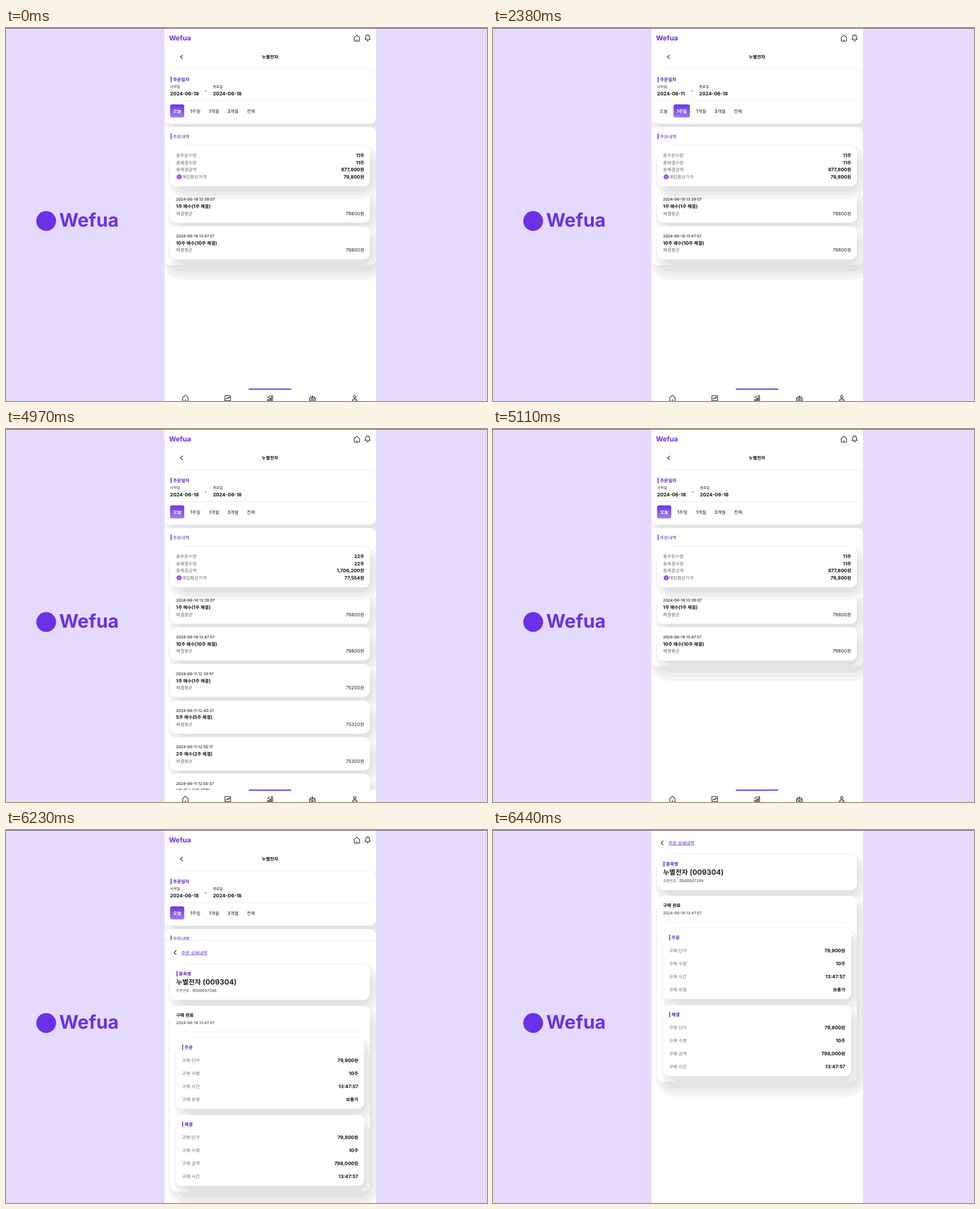
Animation, 850 px wide and 659 px high, one loop 8 s. Source, as an HTML page:

```html
<!DOCTYPE html>
<html lang="ko">
<head>
<meta charset="utf-8">
<title>주문내역</title>
<style>
  html, body { margin: 0; width: 100%; height: 100%; overflow: hidden; background: #e4dafd; }
  svg { display: block; width: 100vw; height: 100vh; }
  text {
    font-family: Inter, "Noto Sans CJK KR", "Noto Sans CJK", sans-serif;
    text-rendering: geometricPrecision;
    white-space: pre;
  }
  .hangul { font-size: .94em; }
  .shade { mix-blend-mode: darken; }
  .icon { fill: none; stroke: #222; stroke-width: 1.1; stroke-linecap: round; stroke-linejoin: round; }

  .day, .week, .month, .few, .many, .sheet { animation: 8s step-end infinite; }
  .day { animation-name: day; }
  .week { animation-name: week; }
  .month { animation-name: month; }
  .few { animation-name: few; }
  .many { animation-name: many; }
  .sheet { animation-name: sheet; }

  @keyframes day {
    0%, 62.125% { visibility: visible; }
    29.75% { visibility: hidden; }
    100% { visibility: visible; }
  }
  @keyframes week {
    0%, 42%, 100% { visibility: hidden; }
    29.75% { visibility: visible; }
  }
  @keyframes month {
    0%, 62.125%, 100% { visibility: hidden; }
    42% { visibility: visible; }
  }
  @keyframes few {
    0%, 63.875%, 100% { visibility: visible; }
    31.5% { visibility: hidden; }
  }
  @keyframes many {
    0%, 63.875%, 100% { visibility: hidden; }
    31.5% { visibility: visible; }
  }
  @keyframes sheet {
    0% { transform: translateY(700px); }
    77% { transform: translateY(488.5px); }
    77.875% { transform: translateY(194px); }
    78.75% { transform: translateY(59px); }
    79.625% { transform: translateY(5px); }
    80.5%, 100% { transform: translateY(0); }
  }
</style>
</head>
<body>
<svg id="stage" viewBox="0 0 850 659"></svg>
<script>
const BRAND = 'Wefua', STOCK = '누별전자';
const PURPLE = '#6a31e6', TITLE = '#5b22c6', INK = '#111', GRAY = '#6c6c70';

const rect = (x, y, w, h, fill, r = 0, extra = '') =>
  `<rect x="${x}" y="${y}" width="${w}" height="${h}" rx="${r}" fill="${fill}" ${extra}/>`;

// y is the optical middle of the line
function text(x, y, str, { size = 8.4, weight = 500, fill = INK, anchor = 'start' } = {}) {
  const body = str.replace(/[가-힣]+/g, m => `<tspan class="hangul">${m}</tspan>`);
  return `<text x="${x}" y="${(y + size * .36).toFixed(2)}" font-size="${size}" ` +
    `font-weight="${weight}" fill="${fill}" text-anchor="${anchor}">${body}</text>`;
}

const bold = (x, y, str, opt) => text(x, y, str, { weight: 700, ...opt });
const small = (x, y, str, fill = '#222') => text(x, y, str, { size: 6.75, fill });
const group = (name, body) => `<g class="${name}">${body}</g>`;

// Stepped shadow: colour, radius, then left, top, right, bottom growth
const BANDS = [
  ['#f4f4f4', 36, 3, 2, 18, 26],
  ['#ececec', 28, -3, -6, 11, 19],
  ['#e3e3e3', 22, -10, -12, 4, 11]
];

function shadow(x, y, w, h, drop = 1) {
  return BANDS.map(([fill, r, l, t, rt, b]) =>
    rect(x - l, y - t, w + l + rt, h + t + b * drop, fill, r, 'class="shade"')).join('');
}

const card = (x, y, w, h, drop) => shadow(x, y, w, h, drop) + rect(x, y, w, h, '#fff', 11);

const heading = (x, y, str, weight = 700) =>
  rect(x, y - 5, 1.5, 10, TITLE) + text(x + 4, y, str, { weight, fill: TITLE });

const row = (left, right, y, label, value) =>
  text(left, y, label, { fill: GRAY }) + bold(right, y, value, { anchor: 'end' });

const icon = (x, y, d) => `<path class="icon" transform="translate(${x} ${y})" d="${d}"/>`;
const HOME = 'M-4.7-1.2L0-5.3L4.7-1.2V4.2Q4.7 5.2 3.7 5.2H-3.7Q-4.7 5.2-4.7 4.2ZM0 2.4V5';
const BELL = 'M-4.6 2.8Q-3.2 1-3.2-1.6A3.2 3.5 0 0 1 3.2-1.6Q3.2 1 4.6 2.8ZM-1.5 4.8Q0 6 1.5 4.8';
const BACK = 'M2-3.4L-1.6 0L2 3.4';
const CHART = 'M-5-4.5H5V4.5H-5ZM-3 1.8L-1-.6L.6 .8L3-2M1.3-2H3V-.4';
const BARS = 'M-4.5 5V2.5H-2.5V5M-1 5V0H1V5M2.5 5V-4.5H4.5V5M-4.5-.5L0-4.2';
const INBOX = 'M-2.8-2.5H-3.4L-5 1V4.8H5V1L3.4-2.5H2.8M-5 1H-2L-1 2.6H1L2 1H5M0-5V-.2M-1.8-2L0-.2L1.8-2';
const PERSON = 'M-2.2-2.6A2.2 2.2 0 1 0 2.2-2.6A2.2 2.2 0 1 0-2.2-2.6M-4.2 5Q-4.2 1.4 0 1.4Q4.2 1.4 4.2 5Z';

function period(name, from, endX, active, box, mids) {
  const tabs = ['오늘', '1주일', '1개월', '3개월', '전체'];
  return group(name,
    small(290, 104, '시작일') + small(endX, 104, '종료일') +
    bold(290, 116, from, { size: 8.55 }) + bold(endX, 116, '2024-06-18', { size: 8.55 }) +
    text((endX + 340) / 2, 110, '~', { size: 7, anchor: 'middle' }) +
    rect(box[0], 135, box[1], 23, 'url(#tab)', 3.5) +
    tabs.map((t, i) => text(mids[i], 147, t, {
      anchor: 'middle', fill: i === active ? '#fff' : '#222', weight: i === active ? 600 : 500
    })).join(''));
}

function orders(name, height, totals, list) {
  const items = list.map(([when, count, price], i) => {
    const y = 303 + 64.75 * i;
    return card(290, y - 17.5, 353, 58.5) +
      small(300.5, y, when) +
      bold(300.5, y + 12, `${count}주 매수(${count}주 체결)`) +
      text(300.5, y + 24.5, '체결평균', { fill: GRAY }) +
      text(633, y + 24.5, price + '원', { weight: 400, fill: '#222', anchor: 'end' });
  }).join('');
  const labels = ['총주문수량', '총체결수량', '총체결금액', '매입평균가격'];
  return group(name,
    card(280, 175, 374, height) + heading(291, 191.5, '주문내역', 500) + items +
    card(290, 207.5, 353, 72, .88) +
    labels.map((l, i) => row(i === 3 ? 311 : 300.5, 633, 225 + 12.6 * i, l, totals[i])).join('') +
    '<circle cx="306" cy="263" r="4.4" fill="#9546e6"/>' +
    rect(305.6, 260.3, .9, .9, '#fff') + rect(305.6, 262, .9, 3.4, '#fff'));
}

function details(y, h, title, rows) {
  return card(300.5, y, 332.5, h) + heading(311.5, y + 16.5, title) +
    rows.map(([l, v], i) => row(311, 622.5, y + 39.5 + 23 * i, l, v)).join('');
}

const today = [['2024-06-18 13:39:07', 1, 79800], ['2024-06-18 13:47:57', 10, 79800]];
const older = [
  ['2024-06-11 12:39:57', 1, 75200], ['2024-06-11 12:40:37', 5, 75320],
  ['2024-06-11 12:50:17', 2, 75300], ['2024-06-11 12:50:37', 1, 75300]
];

const page =
  rect(280, 0, 374, 659, '#fff') +
  bold(288, 17.5, BRAND, { size: 12.2, fill: PURPLE }) +
  icon(620, 18, HOME) + icon(639, 17.5, BELL) + icon(310, 51, BACK) +
  bold(466.5, 51, STOCK, { anchor: 'middle' }) +
  card(280, 73, 374, 96) + heading(291, 91, '주문일자') +
  rect(290, 128, 353, 1, '#ececec') +
  period('day', '2024-06-18', 365.7, 0, [290, 25], [302.5, 334.5, 367.8, 401.2, 433]) +
  period('week', '2024-06-11', 364.3, 1, [319, 29], [301.5, 333.5, 367.8, 401.2, 433]) +
  period('month', '2024-05-19', 365.7, 2, [352, 29], [301.5, 332.5, 366.5, 401.2, 433]) +
  orders('few', 244, ['11주', '11주', '877,800원', '79,800원'], today) +
  orders('many', 600, ['22주', '22주', '1,706,200원', '77,554원'], today.concat(older)) +
  rect(280, 637, 374, 22, '#fff') + rect(429, 637, 75, 2, PURPLE) +
  [HOME, CHART, BARS, INBOX, PERSON].map((d, i) => icon(317 + 74.8 * i, 654, d)).join('');

const sheet = group('sheet',
  rect(280, .5, 374, 700, '#fff') + rect(280, .5, 374, 1, '#e2e2e4') +
  icon(298.7, 22.5, BACK) +
  text(310, 22.5, '주문 상세내역', { fill: TITLE }) + rect(310, 26.4, 45.5, .7, TITLE) +
  card(290, 43, 353, 63) + heading(301.5, 60, '종목명') +
  bold(300.5, 74.5, STOCK + ' (009304)', { size: 12.7, fill: '#222' }) +
  small(300.5, 90, '주문번호 : 0000007288', '#555') +
  card(290, 116.5, 353, 328.5) +
  text(300.5, 133, '구매 완료', { weight: 600 }) +
  small(300.5, 146.5, '2024-06-18 13:47:57', '#444') +
  rect(300.5, 162, 332, 1, '#f0f0f0') +
  details(173.5, 125, '주문', [
    ['구매 단가', '79,900원'], ['구매 수량', '10주'], ['구매 시간', '13:47:57'], ['구매 유형', '보통가']
  ]) +
  details(309.5, 125, '체결', [
    ['구매 단가', '79,800원'], ['구매 수량', '10주'], ['구매 금액', '798,000원'], ['구매 시간', '13:47:57']
  ]));

document.getElementById('stage').innerHTML =
  `<defs>
    <linearGradient id="tab" x2="0" y2="1">
      <stop stop-color="#6a35e2"/><stop offset="1" stop-color="#a17ff0"/>
    </linearGradient>
    <clipPath id="column">${rect(280, 0, 374, 659, '#000')}</clipPath>
  </defs>` +
  rect(0, 0, 850, 659, '#e4dafd') +
  `<circle cx="71" cy="341" r="17.5" fill="${PURPLE}"/>` +
  bold(94, 339.3, BRAND, { size: 33, fill: PURPLE }) +
  `<g clip-path="url(#column)">${page}${sheet}</g>` +
  rect(0, 0, 850, 1, '#4b4852');
</script>
</body>
</html>
```
